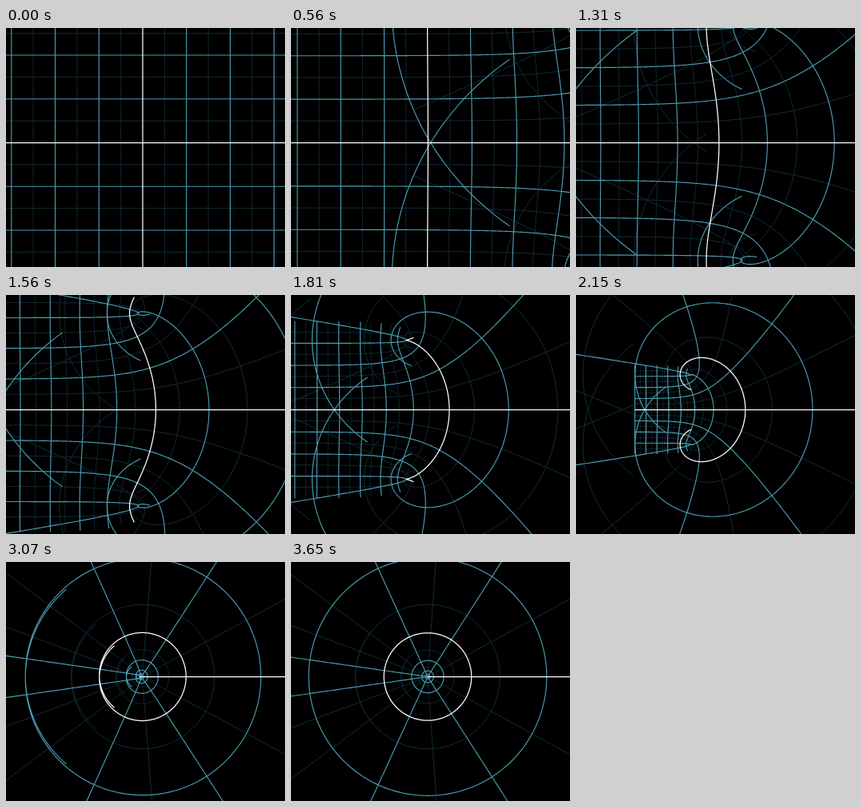
Animation, 349 px wide and 299 px high, one loop 3.74 s. Source, as an HTML page with a canvas:

```html
<!DOCTYPE html>
<html lang="en">
<head>
<meta charset="utf-8">
<title>Complex exponential map</title>
<style>
  html, body { margin: 0; width: 349px; height: 299px; overflow: hidden; background: #000; }
  canvas { display: block; }
</style>
</head>
<body>
<canvas id="stage" width="349" height="299"></canvas>
<script>
const ctx = document.getElementById('stage').getContext('2d');
const LOOP = 3740, START = 301, STEP = 83.6;
const UNIT = 54.75, CX = 171, CY = 143.5;
const X_MAX = 7, Y_MAX = 4, SAMPLES = 420;
const MAIN = '#4a9db2', FAINT = '#122e37', AXIS = '#fff';

// Progress through the transform: [step, fraction of run time]
const KNOTS = [[0.4, 0], [3, 0.0722], [8, 0.2056], [15, 0.4165],
               [22, 0.606], [33, 0.908], [36.3, 1]];

function progress(step) {
  if (step <= KNOTS[0][0]) return 0;
  for (let i = 1; i < KNOTS.length; i++) {
    const [a, u] = KNOTS[i - 1], [b, v] = KNOTS[i];
    if (step <= b) return u + (v - u) * (step - a) / (b - a);
  }
  return 1;
}

const sigmoid = x => 1 / (1 + Math.exp(-x));

function smooth(u) {
  const low = sigmoid(-5);
  return (sigmoid(10 * (u - 0.5)) - low) / (1 - 2 * low);
}

// Straight blend between z and exp(z)
function plot(x, y, k) {
  const r = k * Math.exp(x);
  const re = x * (1 - k) + r * Math.cos(y);
  const im = y * (1 - k) + r * Math.sin(y);
  ctx.lineTo(CX + UNIT * re, CY - UNIT * im);
}

function curve(max, point) {
  ctx.beginPath();
  for (let i = 0; i <= SAMPLES; i++) point(max * (2 * i / SAMPLES - 1));
  ctx.stroke();
}

const vertical = (x, k) => curve(Y_MAX, y => plot(x, y, k));
const horizontal = (y, k) => curve(X_MAX, x => plot(x, y, k));

function pen(color, width) {
  ctx.strokeStyle = color;
  ctx.lineWidth = width;
}

function draw(time) {
  const step = Math.floor((time - START) / STEP);
  const k = smooth(progress(step));
  ctx.fillStyle = '#000';
  ctx.fillRect(0, 0, 349, 299);

  pen(FAINT, 1);
  for (let x = 0.5 - X_MAX; x < X_MAX; x++) vertical(x, k);
  for (let y = 0.5 - Y_MAX; y < Y_MAX; y++) horizontal(y, k);

  pen(MAIN, 1.15);
  for (let x = -X_MAX; x <= X_MAX; x++) if (x) vertical(x, k);
  for (let y = 1 - Y_MAX; y < Y_MAX; y++) if (y) horizontal(y, k);

  pen(AXIS, 1.25);
  vertical(0, k);
  horizontal(0, k);
}

const t0 = performance.now();
function tick() {
  draw((performance.now() - t0) % LOOP);
  requestAnimationFrame(tick);
}
tick();
</script>
</body>
</html>
```
